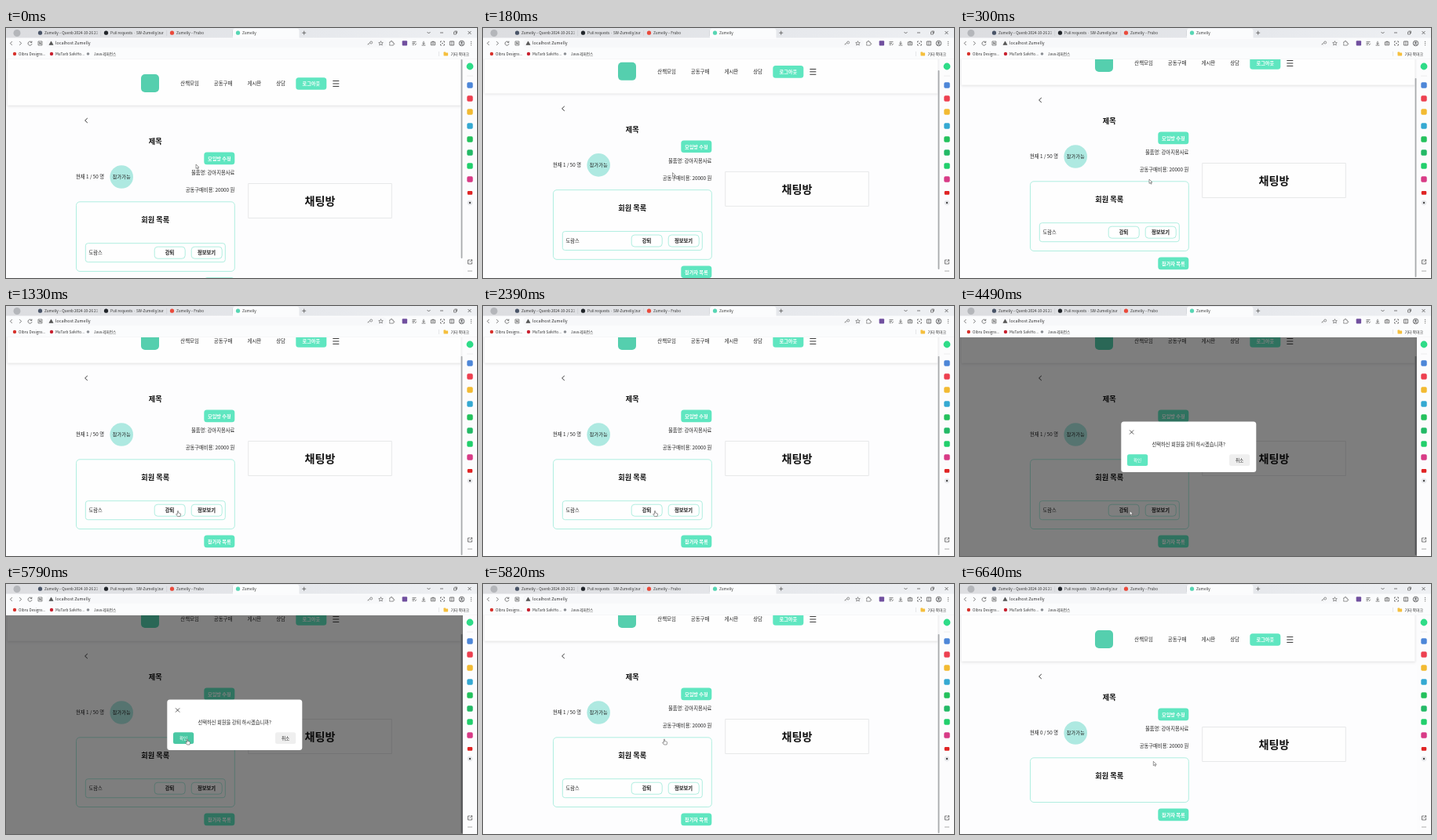
An HTML page with a canvas for the animation above (7120 ms loop, 600x319 px).

```html
<!DOCTYPE html>
<html lang="ko">
<head>
<meta charset="utf-8">
<title>Zumelly</title>
<style>
  html, body { margin: 0; width: 100%; height: 100%; overflow: hidden; background: #fff; }
  canvas { display: block; width: 100vw; height: 100vh; }
</style>
</head>
<body>
<canvas id="stage"></canvas>
<script>
const W = 600, H = 319, LOOP = 7120, MAX_SCROLL = 26;
const MINT = '#5fe6c0', LINE = '#b0eee0', INK = '#222';
const FONT = '"Noto Sans CJK KR", "Noto Sans CJK", "Noto Sans", sans-serif';
const canvas = document.getElementById('stage');
const g = canvas.getContext('2d');

function resize() {
  const d = devicePixelRatio || 1;
  canvas.width = Math.round(innerWidth * d);
  canvas.height = Math.round(innerHeight * d);
}
addEventListener('resize', resize);
resize();

const clamp = v => Math.max(0, Math.min(1, v));
const mix = (a, b, p) => a + (b - a) * p;

function text(s, x, y, size, { color = INK, bold = false, align = 'left' } = {}) {
  g.font = `${bold ? 700 : 400} ${size}px ${FONT}`;
  g.textAlign = align;
  g.fillStyle = color;
  g.fillText(s, x, y + size * 0.37);
}

function rect(x, y, w, h, color) {
  g.fillStyle = color;
  g.fillRect(x, y, w, h);
}

function box(x, y, w, h, r, fill, stroke) {
  g.beginPath();
  g.roundRect(x, y, w, h, r);
  if (fill) { g.fillStyle = fill; g.fill(); }
  if (stroke) { g.strokeStyle = stroke; g.lineWidth = 1; g.stroke(); }
}

function dot(x, y, r, fill, stroke, lw = 0.7) {
  g.beginPath();
  g.arc(x, y, r, 0, Math.PI * 2);
  if (fill) { g.fillStyle = fill; g.fill(); }
  if (stroke) { g.strokeStyle = stroke; g.lineWidth = lw; g.stroke(); }
}

// Strokes an SVG path placed at x, y.
function icon(d, x, y, color = '#444', lw = 0.7, fill) {
  g.save();
  g.translate(x, y);
  const p = new Path2D(d);
  if (fill) { g.fillStyle = fill; g.fill(p); }
  g.strokeStyle = color;
  g.lineWidth = lw;
  g.lineJoin = 'round';
  g.stroke(p);
  g.restore();
}

const STAR = 'M0 -2.8L.8 -.9L2.8 -.8L1.3 .5L1.8 2.5L0 1.4L-1.8 2.5L-1.3 .5L-2.8 -.8L-.8 -.9Z';
const PUZZLE = 'M-2.4 -1.6H-.9A1 1 0 1 1 .9 -1.6H2.2V0A1 1 0 1 1 2.2 1.6V2.6H-2.4V1.4A1 1 0 0 0 -2.4 -.2Z';
const ARROW = 'M0 0V5.4L1.3 4.3L2.2 6.2L3.1 5.8L2.2 4H4Z';
const HAND = 'M-.6 .5Q0 -.6 .6 .5V2.8L3 3.4Q3.8 3.7 3.6 4.8L3 7.2H-.5L-2.4 4.5Q-2.2 3.5 -.6 4.5Z';

function tabs() {
  const sky = g.createLinearGradient(0, 0, W, 0);
  sky.addColorStop(0, '#dcdde0');
  sky.addColorStop(0.65, '#e6e8ec');
  sky.addColorStop(1, '#eef0f3');
  rect(0, 0, W, 13, sky);
  dot(14, 6.5, 4.5, '#b4b6ba');
  const list = [
    [37, '#4a5568', 'Zumelly – Quenb 2024-10-26 21'],
    [121, '#22262b', 'Pull requests · SW-Zumelly/zume'],
    [205, '#ea4b3c', 'Zumelly – Frubo'],
    [289, '#58d6b4', 'Zumelly']
  ];
  list.forEach(([x, color, label], i) => {
    if (i === 3) box(x, 0.8, 84.5, 13, [3, 3, 0, 0], '#fbfcfd');
    else rect(x + 83.6, 3, 0.5, 7, '#c3c5ca');
    dot(x + 6.5, 6.2, 2.6, color);
    g.save();
    g.beginPath();
    g.rect(x + 12, 0, 67.5, 13);
    g.clip();
    text(label, x + 12, 6.2, 4.7, { color: '#333' });
    g.restore();
  });
  icon('M-2.5 0H2.5M0 -2.5V2.5', 379.7, 6.2);
  icon('M-2 -1L0 1L2 -1', 538.5, 6);
  icon('M-2 0H2', 555, 6);
  icon('M-2 -1H1V2H-2ZM-1 -2H2V1', 572.5, 6, '#444', 0.6);
  icon('M-2 -2L2 2M2 -2L-2 2', 590.5, 6);
}

function toolbar() {
  rect(0, 12.5, W, 27.5, '#fbfcfd');
  icon('M1.3 -2.4L-1.1 0L1.3 2.4', 6.5, 19.5);
  icon('M-1.3 -2.4L1.1 0L-1.3 2.4', 18.5, 19.5);
  icon('M2 -1.4A2.5 2.5 0 1 0 2.5 .7M2.4 -2.8V-1H.6', 30.5, 19.5);
  icon('M-2.5 -2.5H2.5V2.5H-2.5ZM-1 1.4V-1.4L1 1.4V-1.4', 43.5, 19.5, '#444', 0.6);
  box(51, 14.3, 434, 10.6, 5, '#f7f8fa');
  icon('M0 -2.4L2.6 2.2H-2.6Z', 57.5, 19.3, '#444', 0.5, '#555');
  text('localhost Zumelly', 63, 19.4, 5.4, { color: '#333' });

  icon('M-3 1.8L.3 -.6M-2 1.1L-1.2 2.2M.2 -.7A1.5 1.5 0 1 1 1.9 .7A1.5 1.5 0 0 1 .2 -.7', 463.5, 19.3, '#555', 0.6);
  icon(STAR, 477.5, 19.5, '#555', 0.6);
  icon(PUZZLE, 491, 19.5, '#555', 0.6);
  box(504.7, 16.2, 6.4, 6.4, 1, '#71509f');
  icon('M-2.5 -1.8H2.5M-2.5 0H1M-2.5 1.8H0M1 2.5L2.7 .3', 520, 19.5);
  icon('M0 -2.7V1M-1.6 -.4L0 1.2L1.6 -.4M-2.4 2.5H2.4', 532, 19.5);
  icon('M-2.6 -1.6H2.6V2.3H-2.6ZM-1 -1.6L-.5 -2.5H.5L1 -1.6', 544, 19.5);
  dot(544, 19.8, 0.9, null, '#444', 0.5);
  icon('M-2.5 -1V-2.5H-1M1 -2.5H2.5V-1M2.5 1V2.5H1M-1 2.5H-2.5V1M-1 0H1', 556, 19.5);
  icon('M-2.5 -2.5H2.5V2.5H-2.5ZM0 -2.5V2.5', 568, 19.5);
  dot(580.5, 19.5, 3.3, '#e3e5e8', '#444');
  dot(580.5, 18.6, 1.1, '#555');
  icon('M-1.8 1.7Q0 -.4 1.8 1.7', 580.5, 19.8);
  for (const y of [17.3, 19.5, 21.7]) dot(592.5, y, 0.55, '#444');

  const opt = { color: '#333' };
  dot(11, 33, 2.2, '#d8322c');
  text('Olbru Designs...', 16, 33, 4.7, opt);
  dot(58, 33, 2.2, '#c8202f');
  text('MuTarb SafeHo...', 63, 33, 4.7, opt);
  dot(104.5, 33, 1.8, '#8b8f94');
  text('Java 레퍼런스', 112, 33, 4.7, opt);
  rect(551, 30, 0.5, 6, '#d0d2d5');
  box(557.5, 31.4, 5.6, 4, 0.6, '#f5bf3d');
  box(557.5, 30.6, 2.6, 1.6, 0.5, '#f5bf3d');
  text('기타 북마크', 566.5, 33, 4.9, opt);
  rect(0, 39.6, W, 0.4, '#eceef0');
}

function sidebar() {
  rect(582, 40, 18, 279, '#fcfcfd');
  dot(591, 49, 4.4, '#2fdc88');
  rect(587, 60.8, 8, 0.5, '#ddd');
  const apps = [
    [73, '#4d86d8'], [90, '#ed4050'], [107, '#f2ba32'], [125, '#35a9d2'],
    [142, '#24c15c'], [159, '#23b966'], [176, '#22cf6c'], [193, '#d83b86']
  ];
  for (const [y, color] of apps) box(587.3, y - 3.7, 7.4, 7.4, 1.8, color);
  box(587.8, 208, 6.4, 4.8, 1.3, '#e02424');
  dot(591, 223, 3.3, '#e8e9ec');
  dot(591, 223, 1.2, '#444');
  icon('M0 -2.5H-2.5V2.5H2.5V0M.8 -2.7H2.7V-.8M2.7 -2.7L-.3 .3', 591, 298.5);
  for (const x of [589, 591, 593]) dot(x, 310, 0.55, '#444');
}

function mintButton(label, x, y) {
  box(x, y, 39, 15.6, 3.5, MINT);
  text(label, x + 19.5, y + 7.8, 6.15, { color: '#fff', bold: true, align: 'center' });
}

function outlineButton(label, x, y) {
  box(x, y, 39, 15, 4, '#fff', LINE);
  text(label, x + 19.2, y + 7.5, 6.25, { color: '#111', bold: true, align: 'center' });
}

function header() {
  g.save();
  g.shadowColor = 'rgba(0,0,0,.1)';
  g.shadowBlur = 3;
  g.shadowOffsetY = 1;
  rect(2, 36, 577.5, 62.7, '#fefefe');
  g.restore();
  box(172, 59, 23, 23, 5, '#55cfae');
  text('산책모임', 222.3, 71, 6.4);
  text('공동구매', 264.8, 71, 6.4);
  text('게시판', 307.6, 71, 6.4);
  text('상담', 344.2, 71, 6.4);
  mintButton('로그아웃', 369.3, 63.2);
  for (const y of [67.6, 71, 74.4]) rect(416.3, y - 0.45, 8, 0.9, '#222');
}

function page(scroll, joined) {
  g.save();
  g.beginPath();
  g.rect(0, 40, 582, 279);
  g.clip();
  rect(0, 40, 582, 279, '#fdfdfe');
  g.translate(0, -scroll);
  header();

  const bold = { color: '#111', bold: true, align: 'center' };
  const right = { align: 'right' };
  icon('M1.6 -3L-1.6 0L1.6 3', 102.2, 118, '#222', 0.9);
  text('제목', 190.3, 144.3, 9.2, bold);
  mintButton('모임방 수정', 252.3, 158.6);
  text(`현재 ${joined ? 1 : 0} / 50 명`, 89, 190, 6.3);
  dot(147.2, 190, 14.8, '#aee9e1');
  text('참가가능', 147.2, 190, 6.2, { align: 'center' });
  text('물품명: 강아지용사료', 291.3, 185, 6.3, right);
  text('공동구매비용: 20000 원', 291.3, 207, 6.3, right);

  box(89.5, 221.8, 201.8, joined ? 88.7 : 56.7, 4.5, '#fefefe', LINE);
  text('회원 목록', 190.3, 244.6, 9.2, bold);
  if (joined) {
    box(101.3, 274.7, 178, 24, 3.2, '#fefefe', LINE);
    text('도람스', 105.5, 287, 6.3);
    outlineButton('강퇴', 189.2, 279.2);
    outlineButton('정보보기', 236.2, 279.2);
  }
  mintButton('참가자 목록', 252.3, joined ? 318.6 : 286.6);

  const y = joined ? 198.5 : 182.5;
  box(308.7, y, 182.6, 44, 0, '#fefefe', '#e7e8e9');
  text('채팅방', 400, y + 22.4, 14.1, bold);
  g.restore();

  if (joined) box(579.6, 40 + scroll * 0.92, 1.8, 254, 0.9, '#a8aaad');
}

function dialog(hover) {
  rect(0, 40, 582, 279, 'rgba(0,0,0,.5)');
  box(205.3, 147.6, 172, 64.4, 3.5, '#fff');
  icon('M-2.6 -2.6L2.6 2.6M2.6 -2.6L-2.6 2.6', 218.6, 161, '#333', 0.8);
  text('선택하신 회원을 강퇴 하시겠습니까?', 291.3, 177, 6.25, { align: 'center' });
  box(213, 189.3, 26.2, 14.8, 2.5, hover ? '#4ac8a4' : MINT);
  text('확인', 226.1, 196.7, 5.6, { color: '#fff', align: 'center' });
  box(343, 189.3, 26.2, 14.8, 2.5, '#efefef');
  text('취소', 356.1, 196.7, 5.6, { align: 'center' });
}

// Pointer stops: time, x, y, hand?
const stops = [
  [300, 241, 193, 0], [820, 219, 261.2, 1], [4490, 216.3, 261.5, 0],
  [5030, 222, 236, 0], [5270, 230.2, 200, 1], [5550, 231, 197.8, 1],
  [6000, 234, 205, 0], [6030, 238, 212, 0], [6060, 242, 219, 0],
  [6090, 245, 224, 0], [6120, 246.3, 226.3, 0]
];

function pointer(t, p) {
  const start = [0, mix(242, 241, p), mix(174, 193, p), 0];
  const [, x, y, hand] = stops.findLast(s => t >= s[0]) || start;
  icon(hand ? HAND : ARROW, x, y, '#555', 0.6, '#fff');
}

function draw(t) {
  g.setTransform(canvas.width / W, 0, 0, canvas.height / H, 0, 0);
  rect(0, 0, W, H, '#fff');
  const p = t < 30 ? 0 : clamp((Math.floor((t - 30) / 33.75) + 1) / 9);
  const joined = t < 6000;
  const scroll = joined ? MAX_SCROLL * p * p * (3 - 2 * p) : 0;
  page(scroll, joined);
  if (t >= 4490 && t < 5820) dialog(t >= 5270);
  tabs();
  toolbar();
  sidebar();
  pointer(t, p);
}

function loop() {
  draw(performance.now() % LOOP);
  requestAnimationFrame(loop);
}
loop();
</script>
</body>
</html>
```
